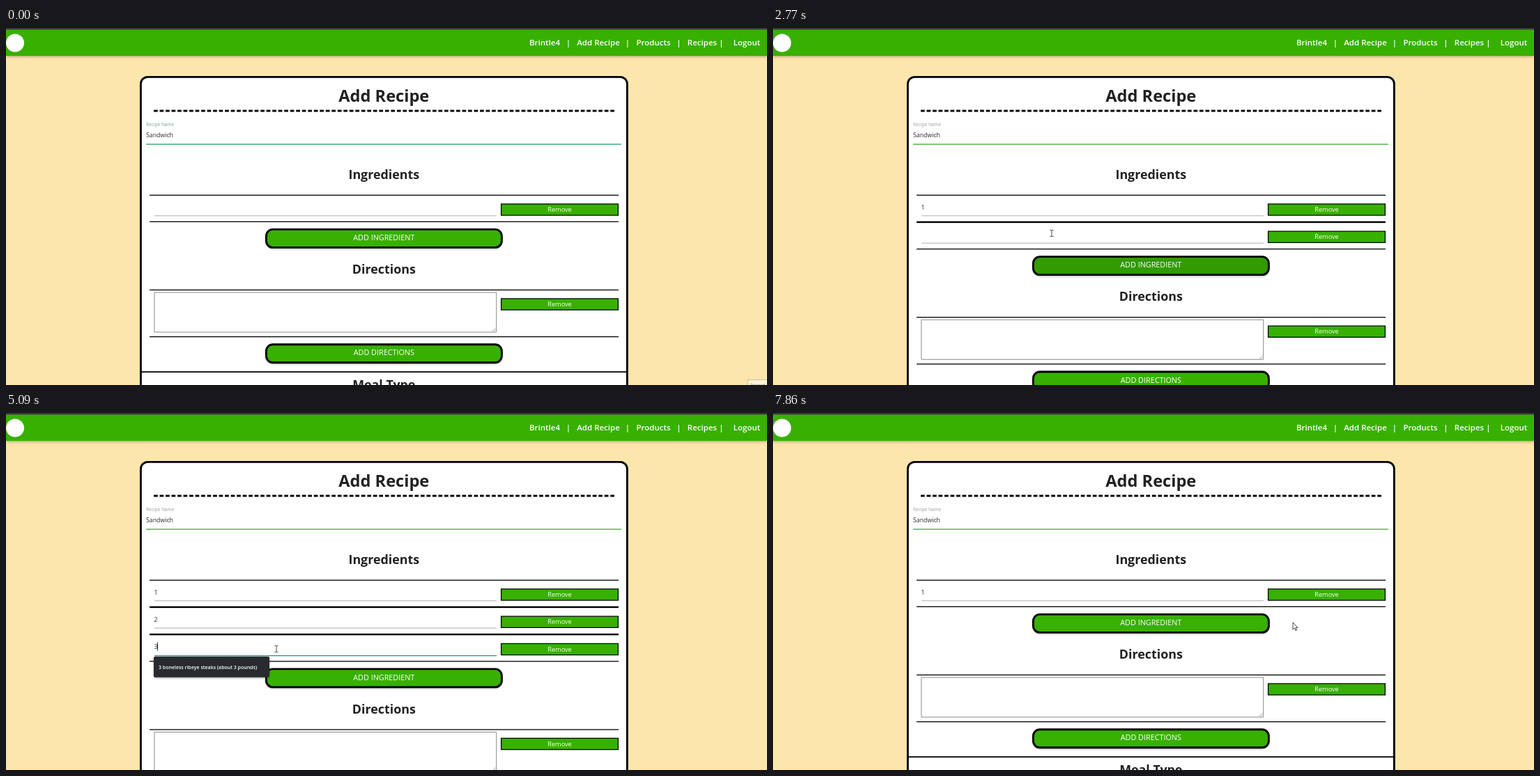
Recreate the animation shown at these times as an HTML page with a canvas. Size 1092x513 px, loop 7.99 s.

```html
<!DOCTYPE html>
<html lang="en">
<head>
<meta charset="utf-8">
<title>Add Recipe</title>
<style>
  html, body { margin: 0; width: 100%; height: 100%; overflow: hidden; }
  canvas { display: block; }
</style>
</head>
<body>
<canvas width="1092" height="513"></canvas>
<script>
const ctx = document.querySelector('canvas').getContext('2d');
const LOOP = 7990, ROW = 39.25;
const GREEN = [56, 176, 0], DARK = [10, 28, 0], GREY = [165, 165, 165], TEAL = [38, 166, 154];

const clamp = v => Math.min(1, Math.max(0, v));
const mix = (a, b, k) => `rgb(${a.map((v, i) => Math.round(v + (b[i] - v) * k))})`;
// Rises from time a, falls back after time b.
const pulse = (t, a, b, rise = 150, fall = 200) =>
  Math.min(clamp((t - a) / rise), 1 - clamp((t - b) / fall));
const anyPulse = (t, spans) => Math.max(...spans.map(([a, b]) => pulse(t, a, b)));

// Time, x, y of the pointer
const path = [
  [130, 803, 458], [390, 803, 458], [1030, 382, 262], [2150, 382, 262],
  [2480, 450, 304], [2600, 440, 303], [2770, 400, 295], [2900, 393, 297],
  [3240, 393, 297], [3660, 437, 346], [3870, 437, 346], [4560, 386, 337],
  [4950, 386, 337], [5090, 388, 339], [5290, 388, 339], [5980, 630, 414],
  [6180, 630, 414], [6480, 662, 318], [6600, 706, 304], [6850, 746, 302]
];
const clicks = [1430, 2540, 2960, 3730, 4630, 6180, 7050, 7450];
const addHover = [[770, 860], [2380, 2600], [3540, 3820], [5560, 5780], [6270, 6340]];
const removeHover = [[6680, 7520]];

// One entry per ingredient field: focus, typing and blur times, with its suggestions
const fields = [
  { focus: 1430, typed: 1880, blur: 2540, text: '1', width: 160,
    list: ['1 egg', '1', '1 (15-oz.) can chickpeas, drained'] },
  { focus: 2960, typed: 3170, blur: 3790, text: '2', width: 180,
    list: ['2 (15-oz.) cans black beans, rinsed and drained', '2 eggs + 1 egg yolk',
      '2 pt. cherry or grape tomatoes'] },
  { focus: 4630, typed: 4760, blur: 6180, text: '3', width: 166,
    list: ['3 boneless ribeye steaks (about 3 pounds)'] }
];
const history = ['Brakes', 'testas', 'Testas', '1 egg', '1', 'asdf'];

function rect(x, y, w, h, color) {
  ctx.fillStyle = color;
  ctx.fillRect(x, y, w, h);
}

function box(x, y, w, h, r, fill, stroke, line) {
  ctx.beginPath();
  ctx.roundRect(x, y, w, h, r);
  ctx.fillStyle = fill;
  ctx.fill();
  if (!stroke) return;
  ctx.shadowColor = 'transparent';
  ctx.strokeStyle = stroke;
  ctx.lineWidth = line;
  ctx.stroke();
}

function text(str, x, y, size, weight, color, align = 'center') {
  ctx.font = `${weight} ${size}px "Open Sans", "Noto Sans", sans-serif`;
  ctx.fillStyle = color;
  ctx.textAlign = align;
  ctx.fillText(str, x, y);
}

function shadow(blur, y, color) {
  ctx.shadowBlur = blur;
  ctx.shadowOffsetY = y;
  ctx.shadowColor = color;
}

const heading = (str, y, size = 17.85) => text(str, 542.3, y, size, 700, '#212121');
const rule = y => rect(206, y, 673, 1.3, '#000');

function bigButton(label, y, hover) {
  ctx.save();
  shadow(3, 2, 'rgba(0,0,0,.35)');
  box(373.4, y + 1.4, 338, 26, 9.5, mix(GREEN, DARK, hover), '#000', 2.9);
  ctx.restore();
  text(label, 542.3, y + 17, 10.8, 500, '#fff');
}

function removeButton(y, hover) {
  box(710.6, y + .6, 167.8, 16.2, 0, mix(GREEN, DARK, hover), '#000', 1.3);
  text('Remove', 794.5, y + 11.8, 9.2, 500, '#fff');
}

function header() {
  ctx.save();
  shadow(4, 1, 'rgba(0,0,0,.35)');
  rect(0, 0, 1092, 40, mix(GREEN, GREEN, 0));
  ctx.restore();
  rect(0, 0, 1092, 2.3, '#3b3b3b');
  ctx.beginPath();
  ctx.arc(13, 21.5, 13, 0, 7);
  ctx.fillStyle = '#fff';
  ctx.fill();
  const items = [['Brintle4', 773], ['Add Recipe', 850], ['Products', 929], ['Recipes', 999], ['Logout', 1063]];
  for (const [label, x] of items) text(label, x, 25.2, 11.5, 600, '#fff');
  for (const x of [807, 892, 965.5, 1026.5]) text('|', x, 25.2, 11.5, 600, '#fff');
}

function recipeName(t) {
  const k = 1 - clamp(t / 130);
  text('Recipe Name', 201, 140.6, 6.55, 400, mix([158, 158, 158], [120, 160, 150], k), 'left');
  text('Sandwich', 201, 157.3, 8.75, 400, '#2b2b2b', 'left');
  rect(201, 166.4, 682, 1.3, mix([62, 172, 40], [38, 160, 105], k));
}

function suggestions(field, y, t) {
  const a = pulse(t, field.focus - 40, field.blur + 20, 40, 85);
  if (a <= 0) return;
  const typed = t >= field.typed;
  const list = typed ? field.list : history;
  const w = typed ? field.width : 111, h = 9 + 20.75 * list.length;
  const scale = t > field.blur ? .95 + .05 * a : 1;
  ctx.save();
  ctx.globalAlpha = a;
  ctx.translate(212 + w / 2, y + h / 2);
  ctx.scale(scale, scale);
  ctx.translate(-w / 2, -h / 2);
  ctx.save();
  shadow(3, 1, 'rgba(0,0,0,.4)');
  box(0, 0, w, h, 2, '#292a2d');
  ctx.restore();
  list.forEach((s, i) => text(s, 7, 17.7 + 20.75 * i, 7, 600, '#fff', 'left'));
  ctx.restore();
}

function ingredient(field, i, t) {
  const y = 239.6 + ROW * i;
  rule(y);
  rule(y + 38.1);
  const focus = pulse(t, field.focus, field.blur, 200, 70);
  rect(213, y + 29.8, 491, .9 + .6 * focus, mix(GREY, TEAL, focus));
  const typed = t >= field.typed;
  if (typed) text(field.text, 212.6, y + 21.2, 8.75, 400, '#2b2b2b', 'left');
  const start = typed ? field.typed : field.focus;
  if (t >= field.focus && t < field.blur && (t - start) % 1060 < 530)
    rect(typed ? 217 : 212.6, y + 11.4, 1, 12, '#222');
  removeButton(y + 12.7, i === 1 ? anyPulse(t, removeHover) : 0);
}

function directions(dy) {
  heading('Directions', 353 + dy);
  rule(375.8 + dy);
  box(212.9, 380 + dy, 490.8, 57, 0, '#fff', '#8a8a8a', 1);
  ctx.beginPath();
  for (const d of [5, 2.5]) {
    ctx.moveTo(702.5 - d, 436 + dy);
    ctx.lineTo(702.5, 436 + dy - d);
  }
  ctx.lineWidth = .7;
  ctx.stroke();
  removeButton(388.3 + dy, 0);
  rule(443 + dy);
  bigButton('ADD DIRECTIONS', 453.3 + dy, 0);
  rect(194, 493.3 + dy, 697, 1.8, '#000');
  heading('Meal Type', 519.3 + dy);
}

function pointerAt(t) {
  let i = path.findIndex(p => p[0] > t);
  if (i < 0) i = path.length;
  const a = path[i - 1], b = path[i] || a;
  const p = b === a ? 0 : (t - a[0]) / (b[0] - a[0]);
  return [a[1] + (b[1] - a[1]) * p, a[2] + (b[2] - a[2]) * p];
}

function pointer(t, rows) {
  if (t < 130) return;
  const [x, y] = pointerAt(t), dy = ROW * (rows - 1);
  const within = (l, top, r, bottom) => x >= l && x <= r && y >= top && y <= bottom;
  const inRow = (l, top, r, bottom) =>
    [...Array(rows).keys()].some(i => within(l, top + ROW * i, r, bottom + ROW * i));

  const age = Math.min(...clicks.map(c => t >= c ? t - c : Infinity));
  if (age < 150) {
    ctx.beginPath();
    ctx.arc(x, y, 9, 0, 7);
    ctx.fillStyle = `rgba(250,245,0,${.5 * (1 - clamp((age - 60) / 90))})`;
    ctx.fill();
  }

  ctx.save();
  ctx.translate(x, y);
  ctx.lineWidth = .9;
  ctx.strokeStyle = '#333';
  ctx.fillStyle = '#fff';
  if (inRow(212, 245, 709, 271) || within(212, 380 + dy, 704, 437 + dy)) {
    ctx.stroke(new Path2D('M-2.5-4.5H-.7L0-4L.7-4.5H2.5M0-4V4M-2.5 4.5H-.7L0 4L.7 4.5H2.5'));
  } else {
    const hand = inRow(710, 252, 879, 270) || within(372, 288 + dy, 713, 317 + dy) ||
      within(372, 453 + dy, 713, 482 + dy);
    const shape = new Path2D(hand
      ? 'M-1 0Q0-1 1 0V4L5 5Q6 5 6 7L5 11H-1L-4 7Q-4 5-1 7Z'
      : 'M0-1V9L2.3 7L4 10.7L5.6 10L4 6.4H7Z');
    ctx.fill(shape);
    ctx.stroke(shape);
  }
  ctx.restore();
}

function draw(t) {
  let shown = [fields[0]];
  if (t >= 2600 && t < 7050) shown.push(fields[1]);
  if (t >= 3800 && t < 7500) shown.push(fields[2]);
  const dy = ROW * (shown.length - 1);

  rect(0, 0, 1092, 513, '#fde6ab');
  header();
  box(193.4, 70.4, 698, 500, 10, '#fff', '#000', 2.9);
  heading('Add Recipe', 106, 23.6);
  for (let i = 0; i < 78; i++) rect(212 + 8.51 * i, 117.6, 5.7, 2.9, '#000');
  recipeName(t);
  heading('Ingredients', 217);
  shown.forEach((f, i) => ingredient(f, i, t));
  bigButton('ADD INGREDIENT', 288 + dy, anyPulse(t, addHover));
  directions(dy);
  shown.forEach((f, i) => suggestions(f, 271.5 + ROW * i, t));
  pointer(t, shown.length);

  if (t < 70) {
    box(1064.5, 505.5, 40, 20, 0, '#fdf3d6', '#c9bfa0', 1);
    text('Record', 1068, 515.5, 6.5, 400, '#8a8372', 'left');
  }
}

const began = performance.now();
function frame() {
  draw((performance.now() - began) % LOOP);
  requestAnimationFrame(frame);
}
frame();
</script>
</body>
</html>
```
